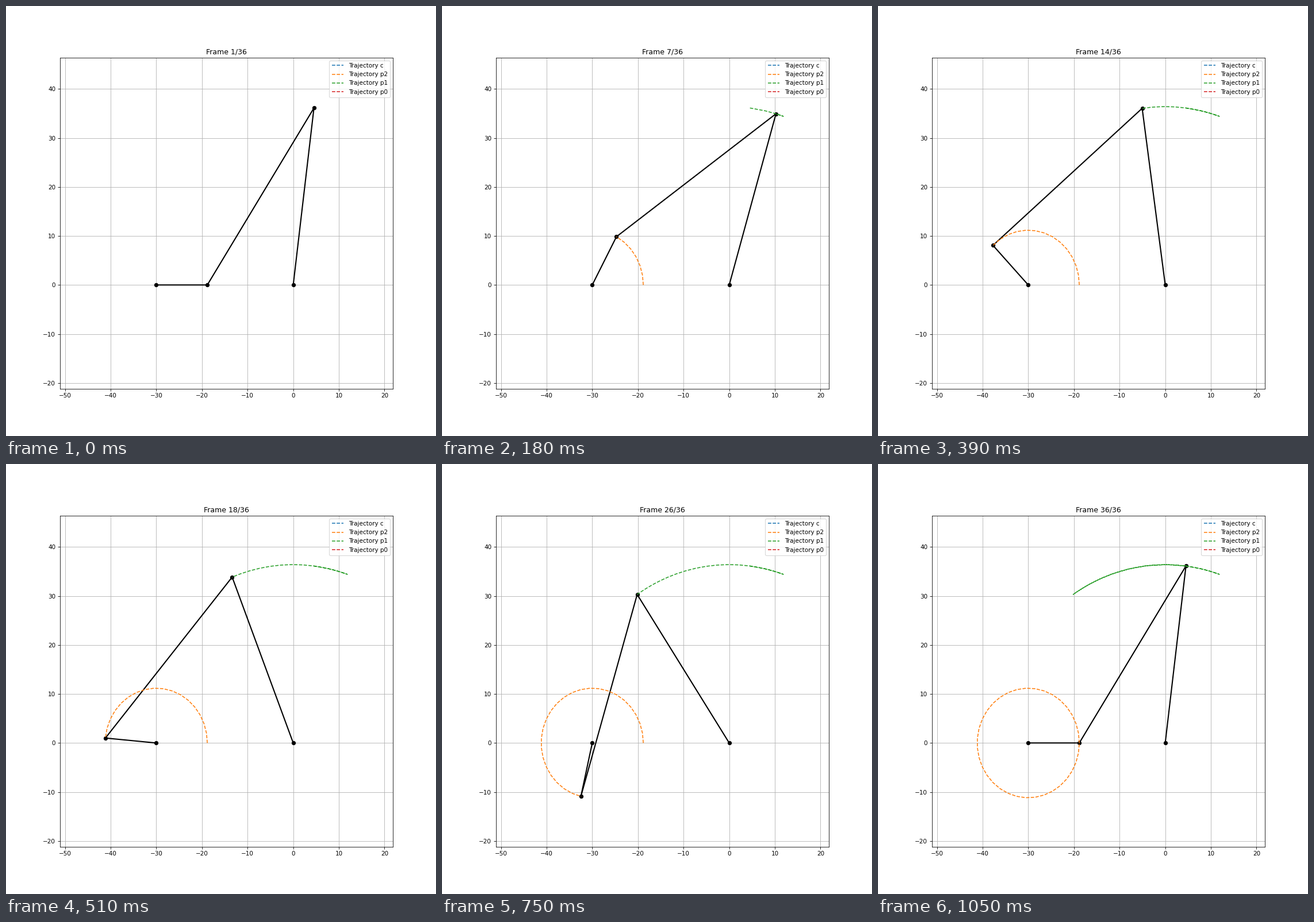
These frames come from a looping animation (748x748 px, 1080 ms). A matplotlib script:

```python
import numpy as np
import matplotlib.pyplot as plt
from matplotlib.animation import FuncAnimation

SIZE, DPI = 10, 74.8  # 748 x 748 px
FRAMES, INTERVAL = 36, 30
MARGIN = 10

# Four-bar linkage: crank p0-p2, coupler p2-p1, rocker p1-c
c = np.array([0.0, 0.0])
p0 = np.array([-30.0, 0.0])
CRANK, COUPLER, ROCKER = np.sqrt([125, 1850, 1325])


def crank_end(angle):
    return p0 + CRANK * np.array([np.cos(angle), np.sin(angle)])


def rocker_end(p2):
    """Upper meeting point of the circles around p2 and c."""
    gap = c - p2
    dist = np.hypot(*gap)
    along = (dist**2 + COUPLER**2 - ROCKER**2) / (2 * dist)
    height = np.sqrt(COUPLER**2 - along**2)
    unit = gap / dist
    return p2 + along * unit + height * np.array([-unit[1], unit[0]])


angles = np.linspace(0, 2 * np.pi, FRAMES)
path_p2 = np.array([crank_end(a) for a in angles])
path_p1 = np.array([rocker_end(p) for p in path_p2])
paths = {
    "c": np.tile(c, (FRAMES, 1)),
    "p2": path_p2,
    "p1": path_p1,
    "p0": np.tile(p0, (FRAMES, 1)),
}

points = np.vstack(list(paths.values()))
low, high = points.min(axis=0) - MARGIN, points.max(axis=0) + MARGIN

fig, ax = plt.subplots(figsize=(SIZE, SIZE), dpi=DPI)
ax.set_xlim(low[0], high[0])
ax.set_ylim(low[1], high[1])
ax.grid(True)

arm, = ax.plot([], [], "ko-", lw=2)
trails = {
    name: ax.plot([], [], "--", color=f"C{k}", label=f"Trajectory {name}")[0]
    for k, name in enumerate(paths)
}
ax.legend(loc="upper right")
title = ax.set_title("")


def update(i):
    arm.set_data(*np.array([p0, path_p2[i], path_p1[i], c]).T)
    for name, line in trails.items():
        line.set_data(*paths[name][: i + 1].T)
    title.set_text(f"Frame {i + 1}/{FRAMES}")
    return [arm, title, *trails.values()]


anim = FuncAnimation(fig, update, frames=FRAMES, interval=INTERVAL,
                     repeat=True, repeat_delay=0, blit=False)
plt.show()
```
